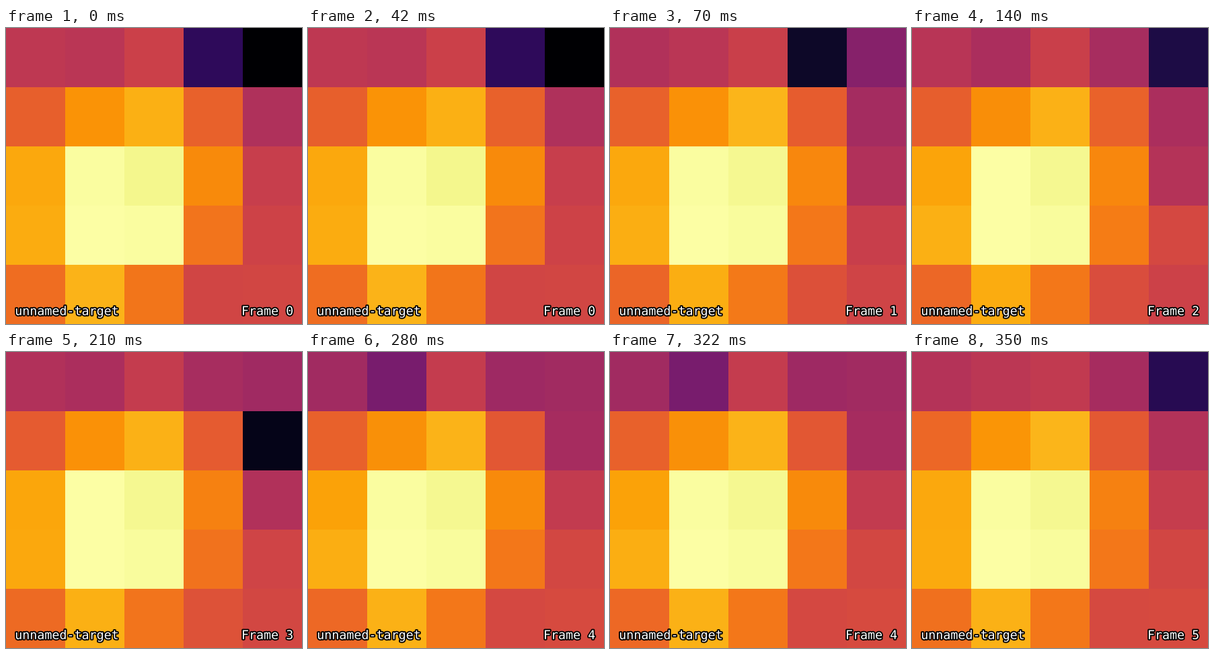
Animation, 440 px wide and 440 px high, one loop 0.42 s. Source, as a matplotlib script:

```python
import numpy as np
import matplotlib.pyplot as plt
from matplotlib import patheffects
from matplotlib.animation import FuncAnimation

SIZE, CELLS, FRAMES, STEP_MS = 440, 5, 6, 70
MARGIN = 0.03
STRETCH = 54   # brightness levels per e-fold of flux
NOISE = 2      # half-width of the flux noise

# Mean brightness of the star on the detector.
STAR = np.array([
    [121, 127, 130, 114, 104],
    [165, 193, 211, 161, 119],
    [204, 254, 249, 188, 127],
    [208, 255, 253, 179, 139],
    [171, 210, 176, 148, 144],
])

# Frame, row, column and brightness of cells that fall dark for one step.
DROPOUTS = [(0, 0, 3, 40), (0, 0, 4, 0), (1, 0, 3, 18), (2, 0, 4, 30),
            (3, 1, 4, 11), (4, 0, 1, 85), (5, 0, 4, 36)]


def exposures():
    """Even noise in flux: on a log scale faint cells flicker the most."""
    rng = np.random.default_rng(4)
    noise = rng.uniform(-NOISE, NOISE, (FRAMES, CELLS, CELLS))
    levels = STRETCH * np.log(np.exp(STAR / STRETCH) + noise)
    for frame, row, col, level in DROPOUTS:
        levels[frame, row, col] = level
    return levels


def label(x, text, align):
    outline = [patheffects.Stroke(linewidth=3, foreground="black"),
               patheffects.Normal()]
    return ax.text(x, MARGIN, text, ha=align, color="white", fontsize=15,
                   family="DejaVu Sans Mono", transform=ax.transAxes,
                   path_effects=outline)


fig = plt.figure(figsize=(CELLS, CELLS), dpi=SIZE / CELLS)
ax = fig.add_axes([0, 0, 1, 1])
ax.axis("off")

light = exposures()
image = ax.imshow(light[0], cmap="inferno", vmin=0, vmax=255,
                  interpolation="nearest", aspect="auto")
label(MARGIN, "unnamed-target", "left")
counter = label(1 - MARGIN + 1 / SIZE, "Frame 0", "right")


def update(frame):
    image.set_data(light[frame])
    counter.set_text(f"Frame {frame}")
    return image, counter


animation = FuncAnimation(fig, update, frames=FRAMES, interval=STEP_MS,
                          repeat=True, repeat_delay=0)
plt.show()
```
